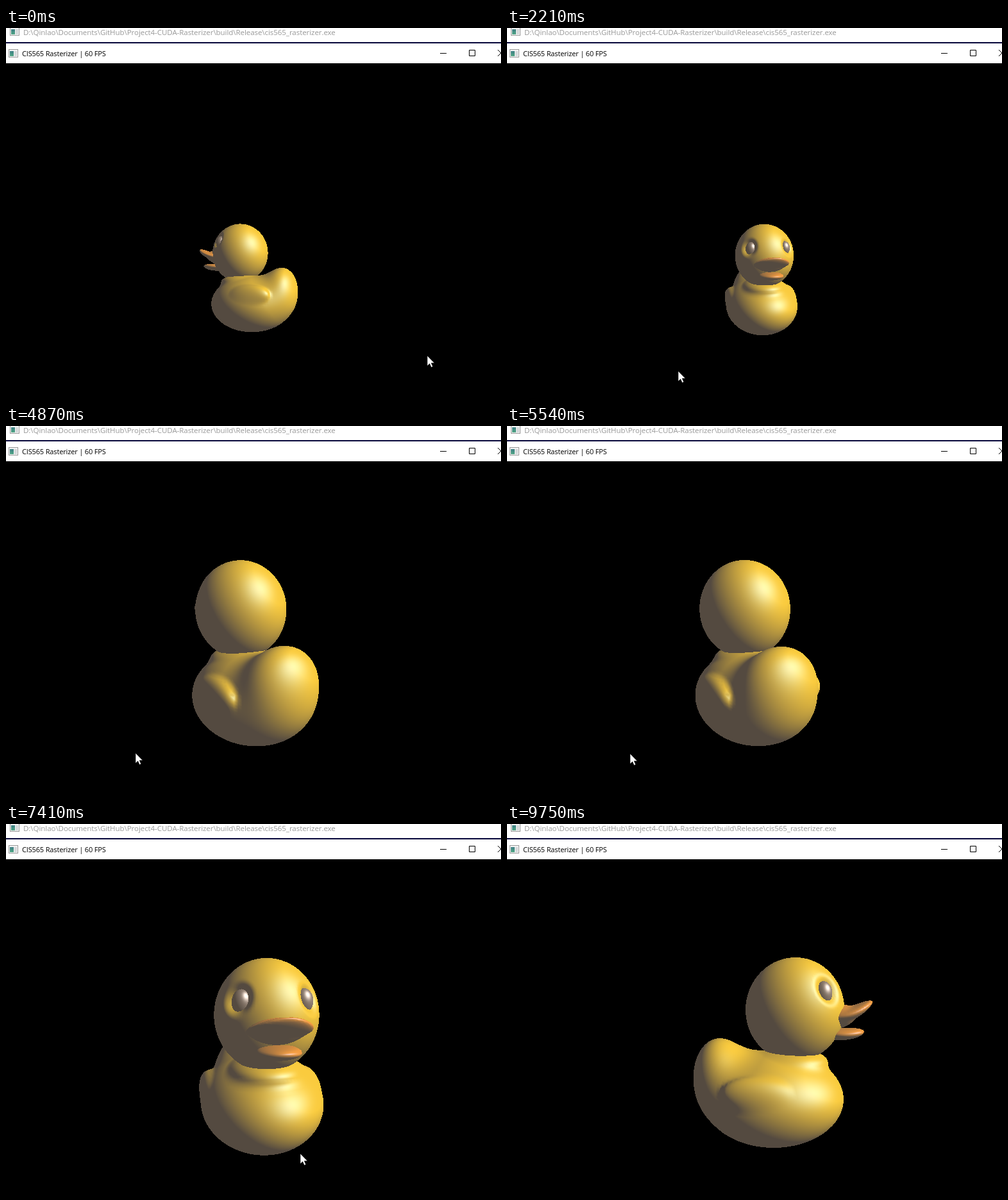
Animation, 772 px wide and 577 px high, one loop 9850 ms. Source, as an HTML page with a canvas:

```html
<!DOCTYPE html>
<html lang="en">
<head>
<meta charset="utf-8">
<title>Rasterizer</title>
<style>
  html, body { margin: 0; width: 100%; height: 100%; overflow: hidden; background: #000; }
  canvas, svg { position: absolute; left: 0; display: block; }
  canvas { top: 55px; }
  svg { top: 0; }
  text { font-family: "Open Sans", "Noto Sans", sans-serif; font-size: 11px; letter-spacing: -.15px; }
  .path { font-size: 11.5px; letter-spacing: -.05px; fill: #999; }
</style>
</head>
<body>
<canvas id="view" width="772" height="522"></canvas>
<svg width="772" height="577" viewBox="0 0 772 577">
  <defs>
    <linearGradient id="teal" x2="0" y2="1">
      <stop stop-color="#3f7f86"/><stop offset="1" stop-color="#4fa583"/>
    </linearGradient>
    <g id="icon">
      <rect x=".5" y=".5" width="14" height="12" fill="#f4f4f4" stroke="#9a9a9a"/>
      <rect x="2" y="3" width="6" height="8" fill="url(#teal)"/>
      <rect x="9" y="3" width="4" height="8" fill="#d4d8da"/>
    </g>
  </defs>
  <rect width="772" height="55" fill="#fff"/>
  <rect y="22" width="772" height="2" fill="#06063a"/>
  <use href="#icon" x="6" y="-1"/>
  <use href="#icon" x="4" y="33"/>
  <text class="path" x="27" y="11">D:\Qinlao\Documents\GitHub\Project4-CUDA-Rasterizer\build\Release\cis565_rasterizer.exe</text>
  <text x="25" y="44">CIS565 Rasterizer | 60 FPS</text>
  <path d="M677 39.5h10M722.5 34.5h9v9h-9zM767 34l10 10M767 44l10-10" fill="none" stroke="#000"/>
  <path id="cursor" d="M0 0V16L3.7 12.6 6.2 18.2 8.7 17.1 6.3 11.6H11.2Z" fill="#fff" stroke="#000" stroke-width=".6"/>
</svg>
<script>
const W = 772, H = 522, TOP = 55;
const LOOP = 9850, FIRST = 120, STEP = 380 / 3, LAST_STEP = 77, ZOOM_STEP = 28;
const RAD = Math.PI / 180;

// Mouse path: redraw step, x, y, and whether the button is held on the way to the next point.
const PATH = [
  [0, 657, 511, 1], [10, 450, 530, 1], [12, 490, 532, 1], [18, 222, 536, 1],
  [23, 151, 546, 1], [27, 186, 526, 0], [28, 186, 501, 1], [31, 299, 510, 0],
  [33, 492, 512, 1], [38, 202, 510, 1], [40, 97, 512, 1], [49, 382, 508, 1],
  [64, 510, 518, 1], [69, 581, 503, 0], [76, 375, 243, 0]
];

// --- Distance fields; origin at the head centre, x forward, y up ---
const ell = (x, y, z, a, b, c) => {
  const k = Math.hypot(x / a, y / b, z / c);
  return k * (k - 1) / (Math.hypot(x / a / a, y / b / b, z / c / c) + 1e-9);
};
const smin = (a, b, k) => {
  const h = Math.max(k - Math.abs(a - b), 0) / k;
  return Math.min(a, b) - h * h * k / 4;
};
const EYE = [.64, .391, .662];
const eyeAt = (r, side) => [r * EYE[0], r * EYE[1], r * EYE[2] * side];

const headField = (x, y, z) => {
  const [ex, ey, ez] = eyeAt(45, 1);
  const socket = Math.hypot(x - ex, y - ey, Math.abs(z) - ez) - 11;
  return -smin(-ell(x, y, z, 41, 43, 40), socket, 6);
};
const bodyField = (x, y, z) => {
  let d = ell(x + 18, y + 75, z, 60, 41, 51);
  d = smin(d, ell(x + 64, y + 51, z, 20, 27, 29), 24);
  d = smin(d, ell(x - 2, y + 43, z, 26, 10, 26), 8);
  return smin(d, ell(x + 30, y + 64, Math.abs(z) - 42, 26, 13, 9), 5);
};
const upperBill = (x, y, z) => smin(
  ell(x - 42, y + 6 - .01 * (x - 28) ** 2, z, 22, 6, 23),
  ell(x - 35, y + 5, z, 13, 10, 17), 6);
const lowerBill = (x, y, z) => ell(x - 40, y + 20 - .004 * (x - 35) ** 2, z, 18, 5, 16);
const eyeField = side => {
  const [ex, ey, ez] = eyeAt(33.5, side);
  return (x, y, z) => ell(x - ex, y - ey, z - ez, 7.5, 9.3, 7.5);
};

// Wraps a grid of rays around a centre and drops it on the surface.
function mesh(field, center, cols, rows, color, gloss) {
  const verts = [];
  for (let j = 0; j <= rows; j++) for (let i = 0; i <= cols; i++) {
    const lat = Math.PI * (j / rows - .5), lon = 2 * Math.PI * i / cols;
    const dir = [Math.cos(lat) * Math.cos(lon), Math.sin(lat), Math.cos(lat) * Math.sin(lon)];
    let r = 130, p;
    for (let n = 0; n < 90; n++) {
      p = dir.map((v, k) => center[k] + v * r);
      const d = field(...p);
      if (Math.abs(d) < .01) break;
      r = Math.max(1, r - d * .75);
    }
    const e = .4, [x, y, z] = p;
    const g = [
      field(x + e, y, z) - field(x - e, y, z),
      field(x, y + e, z) - field(x, y - e, z),
      field(x, y, z + e) - field(x, y, z - e)
    ];
    const len = Math.hypot(...g) || 1;
    verts.push([...p, ...g.map(v => v / len)]);
  }
  return { verts, cols, rows, color, gloss };
}

const YELLOW = [250, 203, 62], ORANGE = [245, 158, 66], GREY = [152, 134, 120];
const SHEEN = [14, 50, 115], GLINT = [150, 150, 150];
const eyeMesh = side => mesh(eyeField(side), eyeAt(33.5, side), 28, 18, GREY, GLINT);
const parts = [
  mesh(bodyField, [-25, -70, 0], 96, 60, YELLOW, SHEEN),
  mesh(headField, [0, 0, 0], 110, 70, YELLOW, SHEEN),
  mesh(upperBill, [42, -4, 0], 56, 48, ORANGE, SHEEN),
  mesh(lowerBill, [40, -19.9, 0], 48, 32, ORANGE, SHEEN),
  eyeMesh(1), eyeMesh(-1)
];

// --- Rasterizer ---
const ctx = document.getElementById("view").getContext("2d");
const cursor = document.getElementById("cursor");
const image = ctx.createImageData(W, H);
const pixels = new Uint32Array(image.data.buffer);
const depth = new Float32Array(W * H);
const AMBIENT = [84, 74, 64], LIGHT = [.7, .48, .53], HALF = [.4, .274, .874];
const dot = (v, x, y, z) => v[0] * x + v[1] * y + v[2] * z;

function shade(o, part, x, y, z) {
  const len = Math.hypot(x, y, z) || 1;
  const lit = dot(LIGHT, x, y, z) / len;
  const diff = Math.min(1, Math.max(0, lit) * 1.12);
  const spec = lit > 0 ? Math.max(0, dot(HALF, x, y, z) / len) ** 20 : 0;
  for (let k = 0; k < 3; k++) {
    image.data[o * 4 + k] = AMBIENT[k] + (part.color[k] - AMBIENT[k]) * diff + part.gloss[k] * spec;
  }
}

function triangle(part, a, b, c) {
  const area = (b[0] - a[0]) * (c[1] - a[1]) - (b[1] - a[1]) * (c[0] - a[0]);
  if (Math.abs(area) < 1e-6) return;
  const x0 = Math.max(0, Math.ceil(Math.min(a[0], b[0], c[0])));
  const x1 = Math.min(W - 1, Math.floor(Math.max(a[0], b[0], c[0])));
  const y0 = Math.max(0, Math.ceil(Math.min(a[1], b[1], c[1])));
  const y1 = Math.min(H - 1, Math.floor(Math.max(a[1], b[1], c[1])));
  for (let y = y0; y <= y1; y++) for (let x = x0; x <= x1; x++) {
    const v = ((x - a[0]) * (c[1] - a[1]) - (y - a[1]) * (c[0] - a[0])) / area;
    const w = ((b[0] - a[0]) * (y - a[1]) - (b[1] - a[1]) * (x - a[0])) / area;
    const u = 1 - v - w;
    if (u < -1e-5 || v < -1e-5 || w < -1e-5) continue;
    const near = u * a[2] + v * b[2] + w * c[2], o = y * W + x;
    if (near <= depth[o]) continue;
    depth[o] = near;
    shade(o, part, u * a[3] + v * b[3] + w * c[3], u * a[4] + v * b[4] + w * c[4], u * a[5] + v * b[5] + w * c[5]);
  }
}

// Turns the duck about a pivot behind and below its head.
function drawDuck(yaw, pitch, zoom, pivotY) {
  const s = Math.sin(yaw * RAD), c = Math.cos(yaw * RAD);
  const sp = Math.sin(pitch * RAD), cp = Math.cos(pitch * RAD);
  const scale = zoom / 41, dist = 28000 / zoom;
  const turn = (x, y, z) => {
    const d = x * c - z * s;
    return [x * s + z * c, y * cp - d * sp, d * cp + y * sp];
  };
  pixels.fill(0xff000000);
  depth.fill(0);
  for (const part of parts) {
    const pts = part.verts.map(v => {
      const p = turn(v[0] + 29, v[1] + 42, v[2]), near = 1 / (1 - p[2] / dist);
      return [394 + scale * p[0] * near, pivotY - TOP - scale * p[1] * near, near, ...turn(v[3], v[4], v[5])];
    });
    const stride = part.cols + 1;
    for (let j = 0; j < part.rows; j++) for (let i = 0; i < part.cols; i++) {
      const n = j * stride + i;
      triangle(part, pts[n], pts[n + 1], pts[n + stride]);
      triangle(part, pts[n + 1], pts[n + stride + 1], pts[n + stride]);
    }
  }
  ctx.putImageData(image, 0, 0);
}

// --- Timeline ---
// Follows the mouse and adds up how far it has dragged.
function mouseAt(step) {
  let [, x, y] = PATH[0], dragX = 0, dragY = 0;
  for (let i = 1; i < PATH.length; i++) {
    const [t0, x0, y0, held] = PATH[i - 1], [t1, x1, y1] = PATH[i];
    if (step <= t0) break;
    const f = Math.min(1, (step - t0) / (t1 - t0));
    x = x0 + (x1 - x0) * f;
    y = y0 + (y1 - y0) * f;
    dragX += held * (x - x0);
    dragY += held * (y - y0);
  }
  return { x, y, dragX, dragY };
}

let shown = -1, drawn = "";
function tick() {
  const t = performance.now() % LOOP;
  const step = Math.max(0, Math.floor((t - FIRST) / STEP + 1 + 1e-6));
  if (step !== shown) {
    shown = step;
    const { x, y, dragX, dragY } = mouseAt(step);
    cursor.setAttribute("transform", `translate(${Math.round(x)} ${Math.round(y)})`);
    cursor.style.display = step >= LAST_STEP ? "none" : "";
    const [zoom, pivotY] = step < ZOOM_STEP ? [44, 394] : [75, 367];
    const view = [-108 + .615 * dragX, -4 + .7 * dragY, zoom, pivotY];
    if (drawn !== view.join()) {
      drawn = view.join();
      drawDuck(...view);
    }
  }
  requestAnimationFrame(tick);
}
tick();
</script>
</body>
</html>
```
